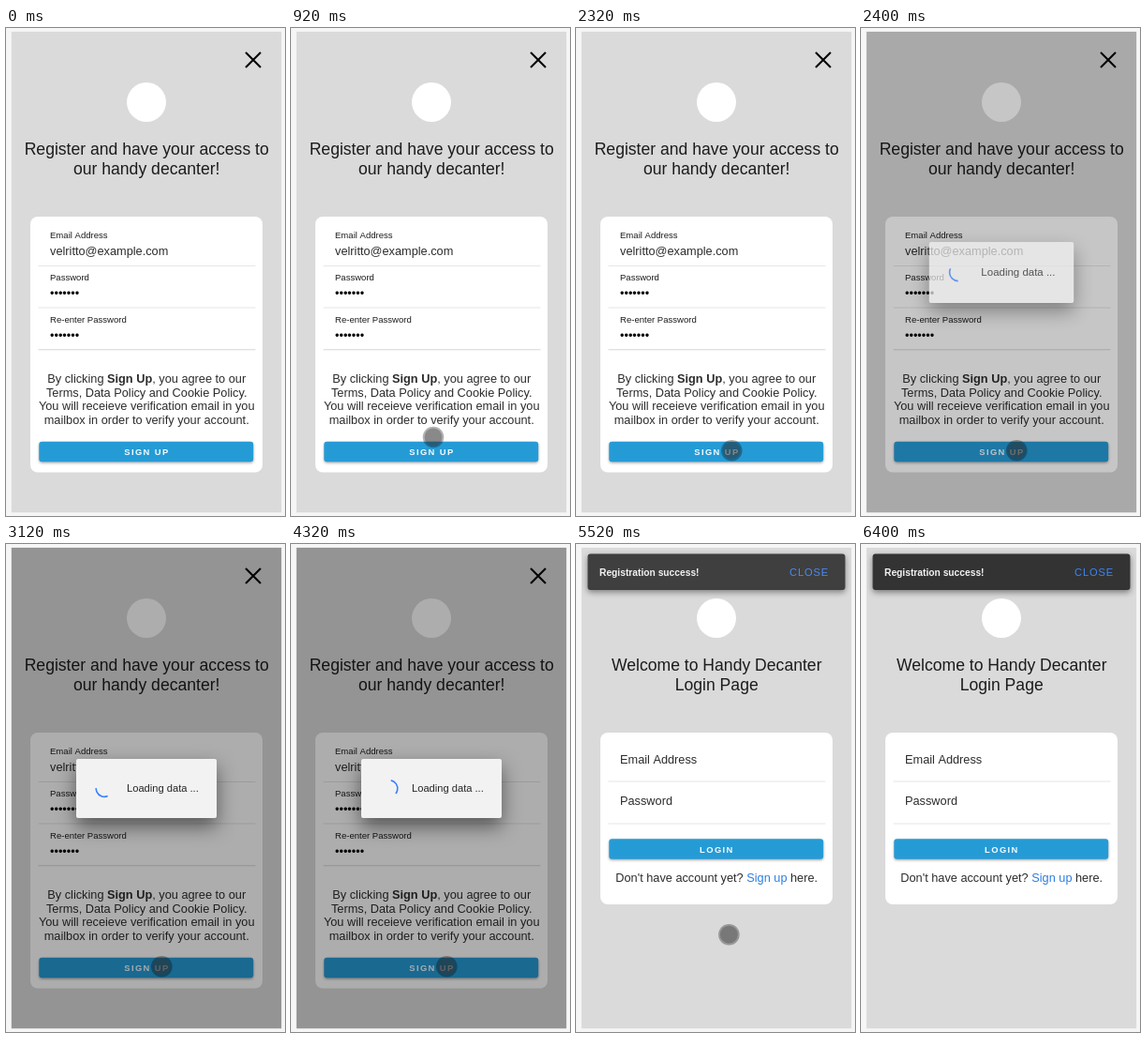
An HTML page with a canvas for the animation above (6520 ms loop, 298x520 px).

```html
<!DOCTYPE html>
<html lang="en">
<head>
<meta charset="utf-8">
<title>Sign up flow</title>
<style>
  html, body { margin: 0; width: 100%; height: 100%; overflow: hidden; background: #f6f6f6; }
  canvas { display: block; width: 298px; height: 520px; }
</style>
</head>
<body>
<canvas id="stage"></canvas>
<script>
const W = 298, H = 520, LOOP = 6520;
const PANEL = [5.6, 3.7, 288.8, 512.8];
const FONT = '"Liberation Sans", Arial, sans-serif';
const BLUE = '#259bd6', LINK = '#3880ff', INK = '#1c1c1c', BODY = '#2c2c2c';

const dpr = window.devicePixelRatio || 1;
const stage = document.getElementById('stage');
const buffer = document.createElement('canvas');
for (const c of [stage, buffer]) {
  c.width = W * dpr;
  c.height = H * dpr;
}
const screen2d = stage.getContext('2d');
const buffer2d = buffer.getContext('2d');
let g = screen2d;

// Linear interpolation through [time, value] pairs
function key(t, points) {
  if (t <= points[0][0]) return points[0][1];
  for (let i = 1; i < points.length; i++) {
    const [t0, a] = points[i - 1], [t1, b] = points[i];
    if (t <= t1) return a + (b - a) * (t - t0) / (t1 - t0);
  }
  return points[points.length - 1][1];
}

function text(str, x, y, size, color = INK, { align = 'left', weight = 400, spacing = 0 } = {}) {
  g.font = `${weight} ${size}px ${FONT}`;
  g.letterSpacing = spacing + 'px';
  g.textAlign = align;
  g.fillStyle = color;
  g.fillText(str, x, y);
  g.letterSpacing = '0px';
}

const centered = (str, y, size, color) => text(str, 150.2, y, size, color, { align: 'center' });

// Runs of [string, weight, color] centred together on one line
function runs(parts, y, size) {
  const widths = parts.map(([str, weight]) => {
    g.font = `${weight} ${size}px ${FONT}`;
    return g.measureText(str).width;
  });
  let x = 150.2 - widths.reduce((a, b) => a + b) / 2;
  parts.forEach(([str, weight, color], i) => {
    text(str, x, y, size, color || BODY, { weight });
    x += widths[i];
  });
}

function box(x, y, w, h, r, color, shadow) {
  g.save();
  if (shadow) {
    g.shadowColor = `rgba(0,0,0,${shadow[2]})`;
    g.shadowBlur = shadow[0] * dpr;
    g.shadowOffsetY = shadow[1] * dpr;
  }
  g.fillStyle = color;
  g.beginPath();
  g.roundRect(x, y, w, h, r);
  g.fill();
  g.restore();
}

function disc(x, y, r, color) {
  g.fillStyle = color;
  g.beginPath();
  g.arc(x, y, r, 0, Math.PI * 2);
  g.fill();
}

function rule(y, color = '#e6e6e6', h = 1) {
  g.fillStyle = color;
  g.fillRect(34.5, y, 232, h);
}

function button(label, y, press = 0) {
  box(35.3, y, 228.9, 21.5, 3, BLUE, [3 + 5 * press, 1.3 + 1.5 * press, 0.35]);
  text(label, 150.4, y + 14.2, 9.4, '#f4fbff', { align: 'center', weight: 700, spacing: 1.4 });
}

// Draws a group and blends it as a whole
function layer(alpha, dy, draw) {
  if (alpha <= 0) return;
  g = buffer2d;
  g.setTransform(1, 0, 0, 1, 0, 0);
  g.clearRect(0, 0, buffer.width, buffer.height);
  g.setTransform(dpr, 0, 0, dpr, 0, dy * dpr);
  draw();
  g = screen2d;
  g.save();
  g.globalAlpha = alpha;
  g.drawImage(buffer, 0, 0, W, H);
  g.restore();
}

function pageBase() {
  g.fillStyle = '#dadada';
  g.fillRect(...PANEL);
  disc(150, 79, 21, '#fff');
}

function signupPage(t) {
  pageBase();
  g.strokeStyle = '#000';
  g.lineWidth = 2.1;
  g.beginPath();
  g.moveTo(256, 26); g.lineTo(272, 42);
  g.moveTo(272, 26); g.lineTo(256, 42);
  g.stroke();

  centered('Register and have your access to', 135, 17.6);
  centered('our handy decanter!', 156, 17.6);

  box(26, 201, 248, 272.5, 8, '#fff');
  text('Email Address', 47, 224, 9.55);
  text('velritto@example.com', 47, 242.3, 12.75, BODY);
  rule(253);
  text('Password', 47, 269, 9.55);
  text('•••••••', 47, 287, 12.7, '#000');
  rule(297.5);

  const focused = t >= 1800 && t < 2200;
  text('Re-enter Password', 47, 314, 9.55, focused ? LINK : INK);
  text('•••••••', 47, 331.7, 12.7, '#000');
  if (focused) {
    rule(341.6, '#2dc76d', 1.7);
    g.fillStyle = '#555';
    g.fillRect(78, 321, 1, 13);
  } else {
    rule(342.3, '#d6d6d6');
  }

  runs([['By clicking ', 400], ['Sign Up', 700], [', you agree to our', 400]], 378, 12.75);
  centered('Terms, Data Policy and Cookie Policy.', 392.6, 12.75, BODY);
  centered('You will receieve verification email in you', 407.2, 12.75, BODY);
  centered('mailbox in order to verify your account.', 421.8, 12.75, BODY);
  button('SIGN UP', 440.7, key(t, [[1800, 0], [2000, 1], [2200, 1], [2300, 0]]));
}

function loginPage() {
  pageBase();
  centered('Welcome to Handy Decanter', 135, 17.6);
  centered('Login Page', 156, 17.6);
  box(26, 201, 248, 183, 8, '#fff');
  text('Email Address', 47, 233.6, 12.75, BODY);
  rule(252.5);
  text('Password', 47, 278.2, 12.75, BODY);
  rule(297.5);
  button('LOGIN', 314.3);
  runs([["Don't have account yet? ", 400], ['Sign up', 400, '#2b7de0'], [' here.', 400]], 360, 12.75);
}

function loadingCard(t, scale) {
  g.translate(150, 260.5);
  g.scale(scale, scale);
  g.translate(-150, -260.5);
  box(75, 229, 150, 63, 2, '#f2f2f2', [20, 9, 0.5]);
  const mid = (148 + (t - 2400) / 750 * 360) * Math.PI / 180;
  g.strokeStyle = LINK;
  g.lineWidth = 1.6;
  g.beginPath();
  g.arc(105, 260.5, 8.8, mid - 1.02, mid + 1.02);
  g.stroke();
  text('Loading data ...', 129, 264.3, 11.15, '#262626');
}

function toast() {
  box(12.5, 10.5, 275, 38.5, 3, '#333', [6, 2.5, 0.45]);
  text('Registration success!', 25, 33.7, 10.25, '#f4f4f4', { weight: 700 });
  text('CLOSE', 228, 33.7, 11.15, '#3d84f5', { spacing: 0.85 });
}

function pointer(t) {
  if (t < 300 || t >= 6100) return;
  const x = key(t, [[300, 206], [600, 186], [900, 152], [1200, 160], [1500, 166.3], [4500, 166.3], [5000, 163.4]]);
  const y = key(t, [[300, 22], [500, 160], [700, 350], [900, 436], [1200, 446], [1500, 450.2], [4500, 450.2], [5000, 416.2]]);
  disc(x, y, 11.3, 'rgba(0,0,0,.3)');
  disc(x, y, 9.4, 'rgba(60,60,60,.35)');
}

function render(t) {
  g = screen2d;
  g.setTransform(dpr, 0, 0, dpr, 0, 0);
  g.fillStyle = '#f6f6f6';
  g.fillRect(0, 0, W, H);

  g.save();
  g.beginPath();
  g.rect(...PANEL);
  g.clip();

  const leave = key(t, [[5200, 0], [5300, 0.1], [5400, 0.58], [5500, 1]]);
  if (leave > 0) loginPage();
  layer(1 - leave, leave * 40, () => signupPage(t));

  const enter = key(t, [[2300, 0], [2400, 0.7], [2500, 1]]);
  const exit = key(t, [[5200, 0], [5300, 0.03], [5400, 0.5], [5500, 1]]);
  const shown = enter * (1 - exit);
  layer(key(t, [[5200, 0], [5300, 0.04], [5400, 0.45], [5500, 0.93], [5600, 1]]), 0, toast);
  if (shown > 0) {
    g.fillStyle = `rgba(0,0,0,${0.32 * shown})`;
    g.fillRect(...PANEL);
    layer(shown, 0, () => loadingCard(t, 1.1 - 0.1 * enter - 0.1 * exit));
  }
  pointer(t);
  g.restore();
}

// Ten steps a second, each starting on a 40 ms grid
function tick() {
  const slot = Math.floor((performance.now() % LOOP) / 40);
  render(Math.floor(slot * 2 / 5) * 100);
  requestAnimationFrame(tick);
}
tick();
</script>
</body>
</html>
```
